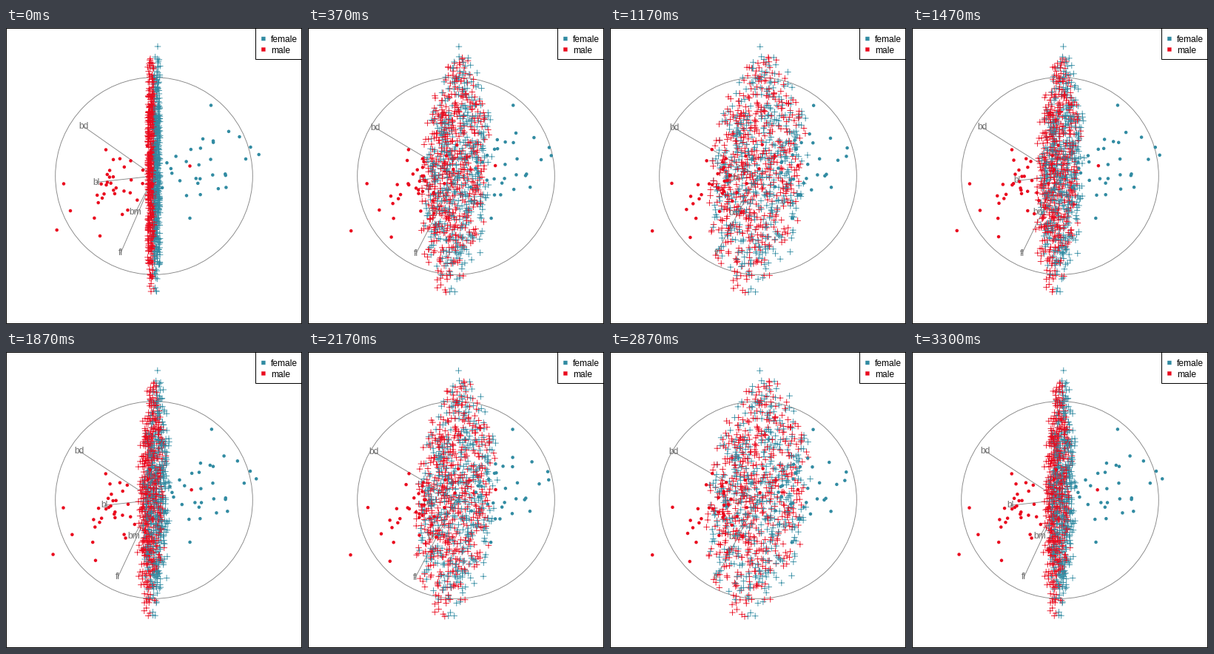
A matplotlib script for the animation above (3330 ms loop, 400 by 400 pixels).

```python
import numpy as np
import matplotlib.pyplot as plt
from matplotlib.animation import FuncAnimation
from matplotlib.patches import Circle, Rectangle

SIZE, DPI = 400, 100
PX = 72 / DPI
FRAMES, LOOP = 100, 3330
STEPS = 25                         # steps of one sweep of the radial tour
CENTER, RADIUS = 200.0, 133.3
THETA = np.radians(36.2)           # angle needed to remove "bl"
DRIFT = np.array([0.994, -0.108])  # on-screen direction of the rotation
BLUE, RED, GREY, INK = "#318ba2", "#ea0a1e", "#858585", "#6e6e6e"
LINE = 0.9 * PX

# Axis tips at the start, as offsets from the centre
AXES = {"bd": (-95.3, -67), "bl": (-78.5, 8.5), "fl": (-45, 104), "bm": (-25, 49)}

# Points are rows of x and y at the start, and x once "bl" is rotated out.
# Outliers of each group; the other observations are drawn at random.
FEMALE_OUT = [(277, 104.5, 268), (315.5, 147, 280.5), (330.5, 161, 306),
              (341.7, 171, 298), (324, 177, 291), (248.5, 257, 242)]
MALE_OUT = [(135, 164.5, 143.5), (78, 210.5, 95), (87, 247, 120),
            (68.7, 273, 61.3), (127, 281, 105), (248.5, 186.5, 253)]


def group(n, mean, spread):
    """Correlated observations around a mean row."""
    a, b, c = rng.uniform(-1.75, 1.75, (3, n))
    shape = np.column_stack([a, 0.9 * c - 0.4 * a, 0.75 * a + 0.66 * b])
    return np.array(mean) + shape * spread


def boundary(n):
    """Points of a ball within the decision hyperplane, nearly edge-on at first."""
    ball = rng.normal(size=(n, 3))
    radius = rng.random(n) ** (1 / 3)
    ball *= (radius / np.linalg.norm(ball, axis=1))[:, None]
    u, v = ball[:, 0], ball[:, 1]
    end_x = CENTER + 98 * u - 20 * v
    end_y = CENTER - 3 + 163 * v
    male = rng.random(n) < 0.64 - 0.25 * radius ** 2
    x = CENTER + np.where(male, rng.uniform(-8.5, 0.3, n), rng.uniform(-0.8, 8.3, n))
    y = end_y - DRIFT[1] / DRIFT[0] * (end_x - x)
    return np.column_stack([x, y, end_x]), male


class Cloud:
    """Points that move along DRIFT as the projection rotates."""

    def __init__(self, rows):
        rows = np.asarray(rows, float)
        self.start = rows[:, :2]
        self.q0 = (self.start - CENTER) @ DRIFT
        self.q1 = self.q0 + (rows[:, 2] - rows[:, 0]) / DRIFT[0]

    def at(self, phi):
        a, b = np.sin(THETA - phi), np.sin(phi)
        q = (a * self.q1 + b * self.q0) / np.sin(THETA)
        return self.start + np.outer(q - self.q0, DRIFT)


def axis_rows():
    rows = []
    for name, offset in AXES.items():
        q = np.dot(offset, DRIFT)
        end = 0 if name == "bl" else q / np.cos(THETA)
        x, y = np.add(offset, CENTER)
        rows.append((x, y, x + (end - q) * DRIFT[0]))
    return rows


def angle(i):
    """Sweep from THETA to zero and back at constant speed, resting one frame."""
    k = i % (2 * STEPS + 2)
    share = 1 - k / STEPS if k <= STEPS else (k - STEPS - 1) / STEPS
    return THETA * share


rng = np.random.default_rng(7)
grid, grid_male = boundary(960)
# Top and bottom tips of the boundary
grid = np.vstack([grid, [(205, 25, 200), (203.5, 356, 194), (196, 356, 177.5)]])
grid_male = np.append(grid_male, [False, False, True])
female = np.vstack([FEMALE_OUT, group(25, (255, 192, 244), (28, 25, 22))])
male = np.vstack([MALE_OUT, group(30, (157, 212, 163), (23, 26, 25))])

crosses = Cloud(grid)
dots = Cloud(np.vstack([female, male]))
tips = Cloud(axis_rows())

plt.rcParams["font.family"] = "Liberation Sans"
fig = plt.figure(figsize=(SIZE / DPI, SIZE / DPI), dpi=DPI, facecolor="white")
ax = fig.add_axes([0, 0, 1, 1])
ax.set_xlim(0, SIZE)
ax.set_ylim(SIZE, 0)
ax.axis("off")

font = dict(fontsize=12 * PX)
ax.add_patch(Circle((CENTER, CENTER), RADIUS, fill=False, ec=GREY, lw=LINE, zorder=1))
spokes = [ax.plot([], [], color=GREY, lw=LINE, zorder=1)[0] for _ in AXES]
labels = [ax.text(0, 0, name, color=INK, ha="center", va="center", zorder=2, **font)
          for name in AXES]


def scatter(cloud, colors, size, **style):
    marks = ax.scatter(*cloud.start.T, c=colors, s=(size * PX) ** 2, **style)
    marks.set_snap(False)
    return marks


def box(x, y, w, h, z, **style):
    ax.add_patch(Rectangle((x, y), w, h, snap=False, zorder=z, **style))


cross_marks = scatter(crosses, np.where(grid_male, RED, BLUE), 8.5, marker="+",
                      linewidths=0.85 * PX, zorder=3)
dot_marks = scatter(dots, [BLUE] * len(female) + [RED] * len(male), 4.5, marker="o",
                    linewidths=0, zorder=4)

# Legend and frame
box(337.5, 0.5, 62, 42, 5, fc="white", ec="black", lw=PX)
for name, color, y in (("female", BLUE, 14.5), ("male", RED, 29)):
    box(345.2, y - 2.7, 5.4, 5.4, 6, fc=color, lw=0)
    ax.text(358, y + 4.7, name, color="black", va="baseline", zorder=6, **font)
box(0.5, 0.5, SIZE - 1, SIZE - 1, 7, fill=False, ec="black", lw=PX)


def draw(i):
    phi = angle(i)
    cross_marks.set_offsets(crosses.at(phi))
    dot_marks.set_offsets(dots.at(phi))
    for spoke, label, (x, y) in zip(spokes, labels, tips.at(phi)):
        spoke.set_data([CENTER, x], [CENTER, y])
        label.set_position((x, y))
    return [cross_marks, dot_marks, *spokes, *labels]


anim = FuncAnimation(fig, draw, frames=FRAMES, interval=LOOP / FRAMES,
                     repeat=True, repeat_delay=0)
plt.show()
```
